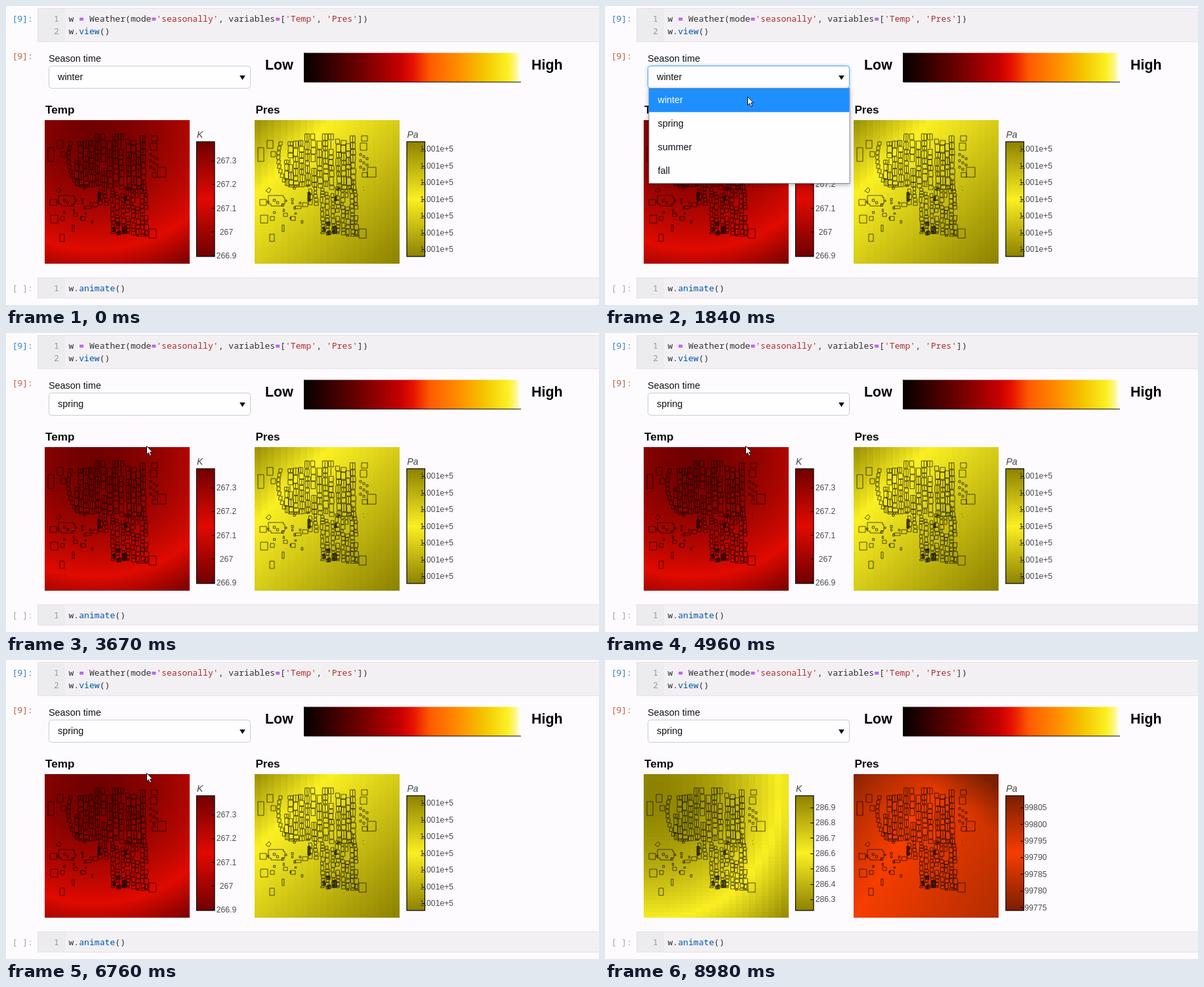
Recreate the animation shown at these times as an HTML page with a canvas. Size 904 by 456 pixels, loop 9000 ms.

```html
<!DOCTYPE html>
<html lang="en">
<head>
<meta charset="utf-8">
<title>Weather viewer</title>
<style>
html, body { margin: 0; width: 100%; height: 100%; overflow: hidden; background: #fdfbfe; }
#stage { position: relative; width: 904px; height: 456px; overflow: hidden; }
canvas, svg { position: absolute; left: 0; top: 0; }
text { font-family: "Liberation Sans", Arial, sans-serif; white-space: pre; }
.code { font: 13.11px "Noto Sans Mono", "DejaVu Sans Mono", monospace; fill: #303030; }
.op { fill: #a422f5; font-weight: 600; }
.str { fill: #b02c2c; }
.fn { fill: #0055aa; }
.num { fill: #999; }
.ui { font-size: 14.4px; fill: #111; }
.title { font-size: 17.2px; font-weight: bold; fill: #0a0a0a; }
.end { font-size: 21.4px; font-weight: bold; fill: #000; }
.unit { font-size: 14px; font-style: italic; fill: #444; }
.tick { font-size: 12.2px; fill: #4c4c4c; text-anchor: middle; }
</style>
</head>
<body>
<div id="stage">
<canvas id="maps" width="904" height="456"></canvas>
<svg width="904" height="456" viewBox="0 0 904 456">
  <defs>
    <linearGradient id="hot">
      <stop offset="0" stop-color="#050000"/>
      <stop offset=".25" stop-color="#6a0000"/>
      <stop offset=".44" stop-color="#c40000"/>
      <stop offset=".5" stop-color="#e51000"/>
      <stop offset=".58" stop-color="#ff5a00"/>
      <stop offset=".72" stop-color="#ff9100"/>
      <stop offset=".83" stop-color="#f4c400"/>
      <stop offset=".94" stop-color="#fbf124"/>
      <stop offset=".975" stop-color="#fdf68c"/>
      <stop offset="1" stop-color="#fff"/>
    </linearGradient>
    <filter id="soft" x="-10%" y="-10%" width="120%" height="130%">
      <feDropShadow dx="0" dy="2" stdDeviation="3" flood-opacity=".3"/>
    </filter>
    <filter id="glow" x="-10%" y="-40%" width="120%" height="180%">
      <feDropShadow dx="0" dy="0" stdDeviation="2.5" flood-color="#66afe9" flood-opacity=".7"/>
    </filter>
  </defs>

  <g id="cells"></g>
  <text class="code" x="9.5" y="24" style="fill:#307fc1">[9]:</text>
  <text class="code" x="9.5" y="80.5" style="fill:#bf5b3d">[9]:</text>
  <text class="code" x="9.5" y="435" style="fill:#a3a3a3">[ ]:</text>
  <text class="code" x="73" y="24" style="fill:#999">1</text>
  <text class="code" x="73" y="43" style="fill:#999">2</text>
  <text class="code" x="73" y="435" style="fill:#999">1</text>
  <text class="code" x="95.5" y="24">w <tspan class="op">=</tspan> Weather(mode<tspan class="op">=</tspan><tspan class="str">'seasonally'</tspan>, variables<tspan class="op">=</tspan>[<tspan class="str">'Temp'</tspan>, <tspan class="str">'Pres'</tspan>])</text>
  <text class="code" x="95.5" y="43">w.<tspan class="fn">view</tspan>()</text>
  <text class="code" x="95.5" y="435">w.<tspan class="fn">animate</tspan>()</text>

  <text class="end" x="395" y="97">Low</text>
  <text class="end" x="801" y="97">High</text>
  <rect x="454" y="71.5" width="331" height="44.5" fill="url(#hot)"/>
  <path d="M454.5 71.5V116H785" fill="none" stroke="#000"/>

  <text class="title" x="60" y="164">Temp</text>
  <text class="title" x="380.4" y="164">Pres</text>
  <text class="unit" x="291" y="201">K</text>
  <text class="unit" x="611.5" y="201">Pa</text>
  <g id="winter"></g>
  <g id="spring"></g>
  <g id="town" fill="none" stroke="#000" stroke-opacity=".66"></g>

  <text class="ui" x="65" y="85">Season time</text>
  <rect id="box" x="65.5" y="91.5" width="307" height="34" rx="4" fill="#fefdff" stroke="#ccc"/>
  <text class="ui" id="choice" x="79" y="113"></text>
  <path d="M356.2 106H364.8L360.5 112.8Z"/>
  <g id="menu">
    <rect x="67" y="125.5" width="306" height="145" fill="#fefdff" stroke="#777" stroke-width=".8" filter="url(#soft)"/>
    <rect id="hover" x="67" width="305.6" height="36" fill="#1e8fff"/>
  </g>
  <path id="cursor" d="M.5 .5V13.2L3.4 10.5L5.5 15.3L7.7 14.3L5.6 9.7H9.4Z" fill="#fff" stroke="#111" stroke-width="1"/>
</svg>
</div>
<script>
const $ = id => document.getElementById(id);
const LOOP = 9000, WIDTH = 221, HEIGHT = 219, TOP = 174, LEFT = { temp: 59, pres: 379 };
const clamp = v => Math.max(0, Math.min(1, v));

const palettes = {
  red: [[112, 0, 0], [224, 10, 0]],
  yellow: [[141, 130, 0], [251, 240, 34]],
  orange: [[122, 31, 0], [246, 61, 0]]
};
const rgb = c => `rgb(${c.map(Math.round)})`;
const shade = ([dark, bright], k) => rgb(dark.map((d, i) => d + (bright[i] - d) * k));

// Brightness fields over a map, x and y in local pixels
const ridge = (v, peak, end) => clamp(v < peak ? v / peak : (end - v) / (end - peak));
const bowl = (r, peak, end, power) => r < peak ? Math.pow(r / peak, power) : ridge(r, peak, end);
const fields = {
  winterTemp: (x, y) => bowl(Math.hypot((x - 75) * .85, y - 20), 177, 238, 1.6),
  winterPres: (x, y) => ridge(x + y + 14, 130, 450),
  springTemp: (x, y) => bowl(Math.hypot(x - 11, y - 26), 197, 288, 1.8),
  springPres: (x, y) => {
    const d = x + y * .6;
    const base = d < 132 ? .1 + .9 * Math.pow(d / 132, .7) : 1 - (d - 132) / 400;
    const corner = clamp((x - y * 1.3 - 95) / 160);
    return clamp(base * (.75 + .25 * clamp(y / 50)) - corner);
  }
};

const seasons = {
  winter: {
    temp: { field: "winterTemp", hue: "red", cell: [2, 2], first: 236, gap: 36.05,
            labels: ["267.3", "267.2", "267.1", "267", "266.9"] },
    pres: { field: "winterPres", hue: "yellow", cell: [10, 2], first: 218, gap: 25.5,
            labels: Array(7).fill("1.001e+5") }
  },
  spring: {
    temp: { field: "springTemp", hue: "yellow", cell: [10, 6], first: 224.5, gap: 23.4,
            labels: Array.from({ length: 7 }, (_, i) => (286.9 - i / 10).toFixed(1)) },
    pres: { field: "springPres", hue: "orange", cell: [5, 3], first: 225, gap: 25.35,
            labels: Array.from({ length: 7 }, (_, i) => String(99805 - 5 * i)) }
  }
};

function paintMap(ctx, left, { field, hue, cell: [w, h] }) {
  for (let y = 0; y < HEIGHT; y += h)
    for (let x = 0; x < WIDTH; x += w) {
      ctx.fillStyle = shade(palettes[hue], fields[field](x + w / 2, y + h / 2));
      ctx.fillRect(left + x, TOP + y, Math.min(w, WIDTH - x), Math.min(h, HEIGHT - y));
    }
}

function colorBar(id, x, { hue, first, gap, labels }) {
  const [dark, bright] = palettes[hue].map(rgb);
  const marks = labels.map((label, i) => {
    const y = first + i * gap;
    return `<path d="M${x + 23} ${Math.round(y) + .5}h5" stroke="#000"/>
      <text class="tick" x="${x + 46}" y="${y + 4.4}">${label}</text>`;
  }).join("");
  return `<linearGradient id="${id}" x2="0" y2="1"><stop stop-color="${dark}"/>
    <stop offset=".5" stop-color="${bright}"/><stop offset="1" stop-color="${dark}"/></linearGradient>
    <rect x="${x + .5}" y="207" width="27.5" height="175" fill="url(#${id})" stroke="#000" stroke-width="1.2"/>${marks}`;
}

// Town outlines: columns of lots, then single buildings
let seed = 17;
const rand = () => (seed = seed * 16807 % 2147483647) / 2147483647;
const lot = (x, y, w, h, skew = 0) =>
  `M${x.toFixed(1)} ${y.toFixed(1)}h${w.toFixed(1)}l${skew.toFixed(1)} ${h.toFixed(1)}h${(-w).toFixed(1)}z`;
const columns = [
  [104, 235, 274], [110, 207, 275], [118, 206, 275], [127, 205, 276], [136, 195, 274],
  [145, 195, 275], [154, 206, 276], [163, 195, 276], [172, 195, 280], [183, 203, 280],
  [191, 205, 278], [198, 210, 278], [205, 198, 280],
  [158, 278, 346], [165, 284, 348], [174, 286, 346], [181, 276, 346], [189, 280, 350],
  [196, 280, 350], [203, 278, 350], [209, 280, 350], [148, 276, 304], [140, 279, 304]
];
const singles = [
  [64, 216, 9, 21], [78, 205, 9, 12], [84, 222, 7, 8], [231, 246, 13, 15], [67, 295, 10, 9],
  [68, 319, 11, 12], [82, 348, 7, 11], [218, 340, 11, 14], [222, 198, 9, 8], [220, 209, 10, 11],
  [223, 254, 8, 7], [132, 300, 8, 6], [121, 305, 9, 4], [103, 316, 6, 5], [114, 321, 7, 6],
  [83, 321, 6, 6], [101, 334, 3, 10]
];
function townPath() {
  let d = "";
  for (const [x0, y0, y1] of columns) {
    const lower = y0 > 274;
    for (let y = y0; y < y1;) {
      const h = Math.min(y1 - y + 2, lower ? 4 + rand() * 5 : 6 + rand() * 7);
      const w = lower ? 4 + rand() * 2.5 : 6 + rand() * 2;
      const x = x0 + (y - 240) * .02 + rand();
      if (rand() > .06) d += lot(x, y, w, h - .8, rand() - .5);
      if (!lower && rand() > .45) d += `M${(x + w / 2).toFixed(1)} ${y.toFixed(1)}v${(h - 1).toFixed(1)}`;
      y += h + rand() * .7;
    }
  }
  for (const s of singles) d += lot(...s);
  for (let i = 0; i < 9; i++) d += lot(93 + Math.pow(i - 3, 2) * .35, 207 + i * 7, 5, 5.5, -.6);
  for (let i = 0; i < 8; i++) d += lot(219 + i % 3 * 5, 225 + i * 3.2, 3, 3);
  for (let i = 0; i < 15; i++) d += lot(78 + rand() * 52, 276 + rand() * 52, 1.5 + rand() * 2, 2 + rand() * 2);
  d += "M80 289h23v3h2v10h-4v3h-17v-3h-4zM76 282l5 -5l3 3l-3 5zM214 290h1M225 281h1M224 276h1";
  return d;
}
const darkLots = lot(140, 284, 4, 14) + lot(178, 336, 6, 11) + lot(170, 343, 5, 6) +
  lot(169, 329, 5, 6) + lot(181, 290, 3, 7) + lot(163, 337, 3, 6);

function build() {
  $("cells").innerHTML = [[4, 51], [415, 31]].map(([y, h]) =>
    `<rect x="48.5" y="${y - .5}" width="860" height="${h}" fill="#f2f0f3" stroke="#e4e2e5"/>
     <rect x="49" y="${y}" width="41" height="${h - 1}" fill="#ecebee"/>`).join("");
  for (const name in seasons) {
    const { temp, pres } = seasons[name];
    $(name).innerHTML = colorBar(name + "T", 290, temp) + colorBar(name + "P", 610.5, pres);
  }
  const d = townPath();
  $("town").innerHTML = [0, 320].map(dx => `<g transform="translate(${dx})">
    <path d="${d}"/><path d="${darkLots}" fill="#000" fill-opacity=".55"/></g>`).join("");
  $("menu").insertAdjacentHTML("beforeend", ["winter", "spring", "summer", "fall"].map((name, i) =>
    `<text class="ui item" x="80.5" y="${148 + 36 * i}">${name}</text>`).join(""));
}

const OPEN = 1200, PICK = 2350, UPDATE = 6850;
const path = [
  [90, 152, 438], [750, 217, 103], [1350, 217, 103], [1700, 217, 138], [1880, 217, 138],
  [2200, 214, 172], [8300, 214, 172], [8880, 158, 432]
];
function cursorAt(t) {
  const i = path.findIndex(p => p[0] > t);
  if (i < 1) return null;
  const [t0, x0, y0] = path[i - 1], [t1, x1, y1] = path[i];
  const u = (t - t0) / (t1 - t0), k = u * u * (3 - 2 * u);
  return [x0 + (x1 - x0) * k, y0 + (y1 - y0) * k];
}

const show = (el, on) => { el.style.display = on ? "" : "none"; };
let painted;
function setSeason(name) {
  if (painted === name) return;
  painted = name;
  const ctx = $("maps").getContext("2d");
  for (const key in LEFT) paintMap(ctx, LEFT[key], seasons[name][key]);
  for (const other in seasons) show($(other), other === name);
}

function render(t) {
  setSeason(t < UPDATE ? "winter" : "spring");
  $("choice").textContent = t < PICK ? "winter" : "spring";
  const open = t >= OPEN && t < PICK, pos = cursorAt(t);
  show($("menu"), open);
  $("box").setAttribute("stroke", open ? "#5aa6e6" : "#ccc");
  $("box").setAttribute("filter", open ? "url(#glow)" : "none");
  const row = pos && pos[1] >= 161 ? 1 : 0;
  $("hover").setAttribute("y", 125.8 + 36 * row);
  document.querySelectorAll(".item").forEach((el, i) => { el.style.fill = i === row ? "#fff" : "#111"; });
  show($("cursor"), pos);
  if (pos) $("cursor").setAttribute("transform", `translate(${pos})`);
}

build();
const start = performance.now();
function tick() {
  render((performance.now() - start) % LOOP);
  requestAnimationFrame(tick);
}
tick();
</script>
</body>
</html>
```
